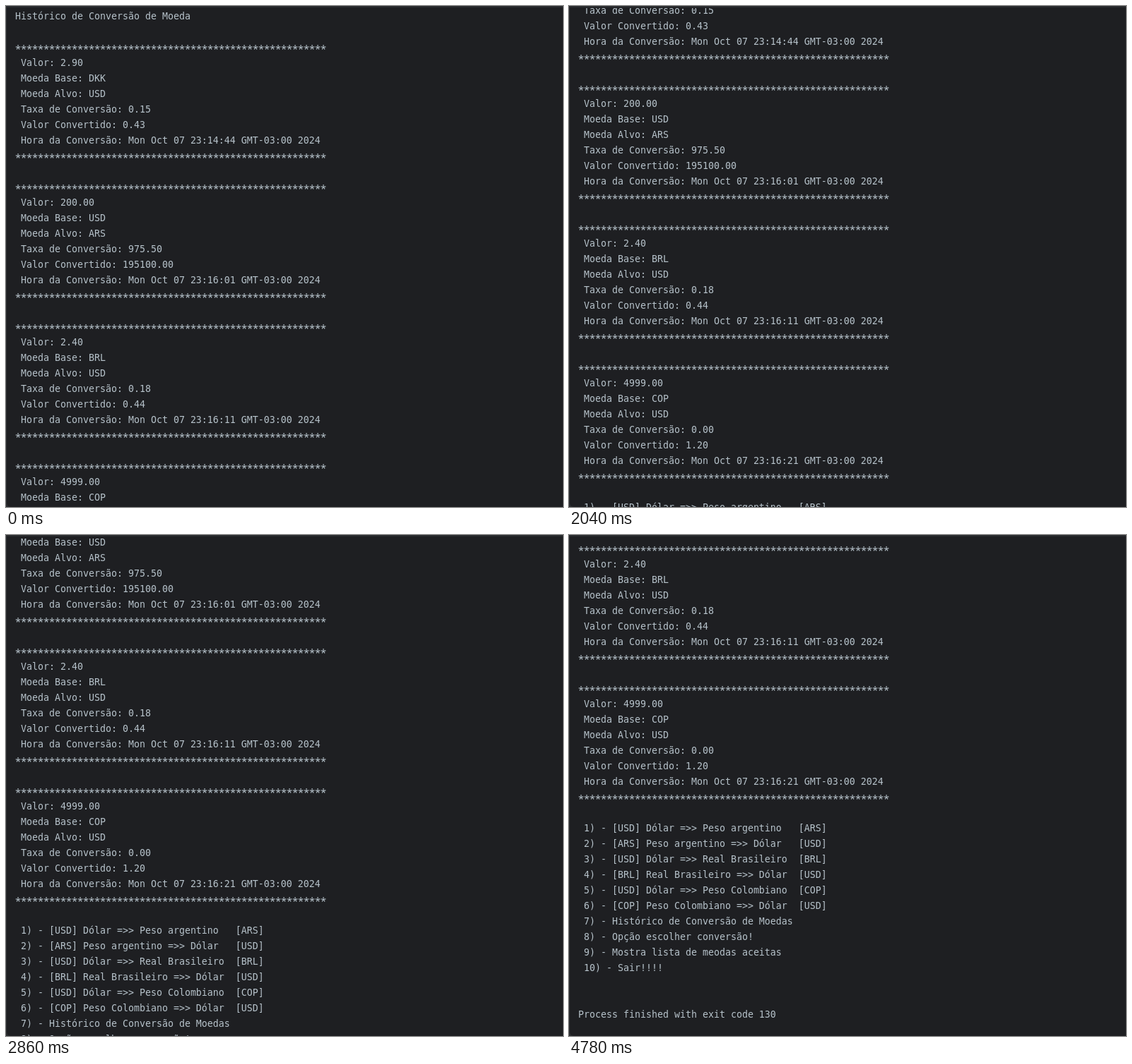
An HTML page that plays this animation: 788 by 710 pixels, repeating every 5.14 s.

```html
<!DOCTYPE html>
<html lang="pt-BR">
<head>
<meta charset="utf-8">
<title>Histórico de Conversão</title>
<style>
  html, body { margin: 0; width: 100%; height: 100%; overflow: hidden; background: #2b2d30; }
  #panel {
    position: absolute; left: 1px; top: 2px; width: 787px; height: 708px;
    overflow: hidden; background: #1e1f22; border-bottom-left-radius: 6px;
  }
  #view { position: absolute; inset: 1px 0 0; overflow: hidden; }
  #log {
    position: absolute; left: 12px; top: 0; width: 760px;
    font: 13.29px/22px "DejaVu Sans Mono", monospace;
    font-variant-ligatures: none; color: #b6c2ca; white-space: pre;
  }
  .line { position: relative; top: 1px; height: 22px; }
  .rule { left: -0.8px; top: 4px; font-family: "Noto Sans Mono", monospace; font-size: 16px; letter-spacing: -1.6px; }
  #caret { position: absolute; left: 287px; width: 2px; height: 18px; background: #ced0d6; }
</style>
</head>
<body>
<div id="panel"><div id="view"><div id="log"></div></div></div>
<script>
const LOOP = 5140;
const LINE = 22;
const PX_PER_NOTCH = 435 / 93; // content pixels per pixel of scrollbar drag
const RULE = '*'.repeat(55);

const record = (value, base, target, rate, result, time) => [
  RULE,
  ` Valor: ${value}`,
  ` Moeda Base: ${base}`,
  ` Moeda Alvo: ${target}`,
  ` Taxa de Conversão: ${rate}`,
  ` Valor Convertido: ${result}`,
  ` Hora da Conversão: Mon Oct 07 ${time} GMT-03:00 2024`,
  RULE,
  '',
];

const option = (number, from, fromName, toName, to) =>
  ` ${number}) - [${from}] ${fromName} =>> ${toName}`.padEnd(39) + `[${to}]`;

const lines = [
  'Histórico de Conversão de Moeda',
  '',
  ...record('2.90', 'DKK', 'USD', '0.15', '0.43', '23:14:44'),
  ...record('200.00', 'USD', 'ARS', '975.50', '195100.00', '23:16:01'),
  ...record('2.40', 'BRL', 'USD', '0.18', '0.44', '23:16:11'),
  ...record('4999.00', 'COP', 'USD', '0.00', '1.20', '23:16:21'),
  option(1, 'USD', 'Dólar', 'Peso argentino', 'ARS'),
  option(2, 'ARS', 'Peso argentino', 'Dólar', 'USD'),
  option(3, 'USD', 'Dólar', 'Real Brasileiro', 'BRL'),
  option(4, 'BRL', 'Real Brasileiro', 'Dólar', 'USD'),
  option(5, 'USD', 'Dólar', 'Peso Colombiano', 'COP'),
  option(6, 'COP', 'Peso Colombiano', 'Dólar', 'USD'),
  ' 7) - Histórico de Conversão de Moedas',
  ' 8) - Opção escolher conversão!',
  ' 9) - Mostra lista de meodas aceitas',
  ' 10) - Sair!!!!',
  '',
  '',
  'Process finished with exit code 130',
];

const log = document.getElementById('log');
for (const text of lines) {
  const line = document.createElement('div');
  line.className = text === RULE ? 'line rule' : 'line';
  line.textContent = text;
  log.append(line);
}

const caret = document.createElement('div');
caret.id = 'caret';
caret.style.top = `${lines.findIndex(text => text.startsWith(' 9)')) * LINE + 2}px`;
log.append(caret);

// Drag position of the scrollbar: [time in ms, notches]
const drag = [
  [1340, 0], [1360, 2], [1400, 4], [1520, 4], [2040, 30], [2060, 30],
  [2500, 48], [2600, 51], [2860, 62], [3140, 67], [3340, 77],
  [3680, 87], [3700, 87], [3900, 93],
];

const scroll = [[0, 0]];
for (let i = 1; i < drag.length; i++) {
  const [t0, n0] = drag[i - 1];
  const [t1, n1] = drag[i];
  const count = Math.min(n1 - n0, (t1 - t0) / 20);
  for (let k = 1; k <= count; k++) {
    const f = k / count;
    scroll.push([t0 + (t1 - t0) * f, Math.round(n0 + (n1 - n0) * f)]);
  }
}

const blink = [[0, 1], [3500, 0], [3820, 1], [4140, 0], [4460, 1], [4780, 0]];

// Plays a table of hard steps; each lands 1 ms early to avoid rounding at its edge
function playSteps(element, table, style) {
  const frames = table.map(([time, value]) => ({
    offset: Math.max(0, time - 1) / LOOP, easing: 'step-end', ...style(value),
  }));
  frames.push({ offset: 1, ...style(table.at(-1)[1]) });
  element.animate(frames, { duration: LOOP, iterations: Infinity });
}

playSteps(log, scroll, n => ({ transform: `translateY(${-Math.round(n * PX_PER_NOTCH)}px)` }));
playSteps(caret, blink, on => ({ opacity: on }));
</script>
</body>
</html>
```
